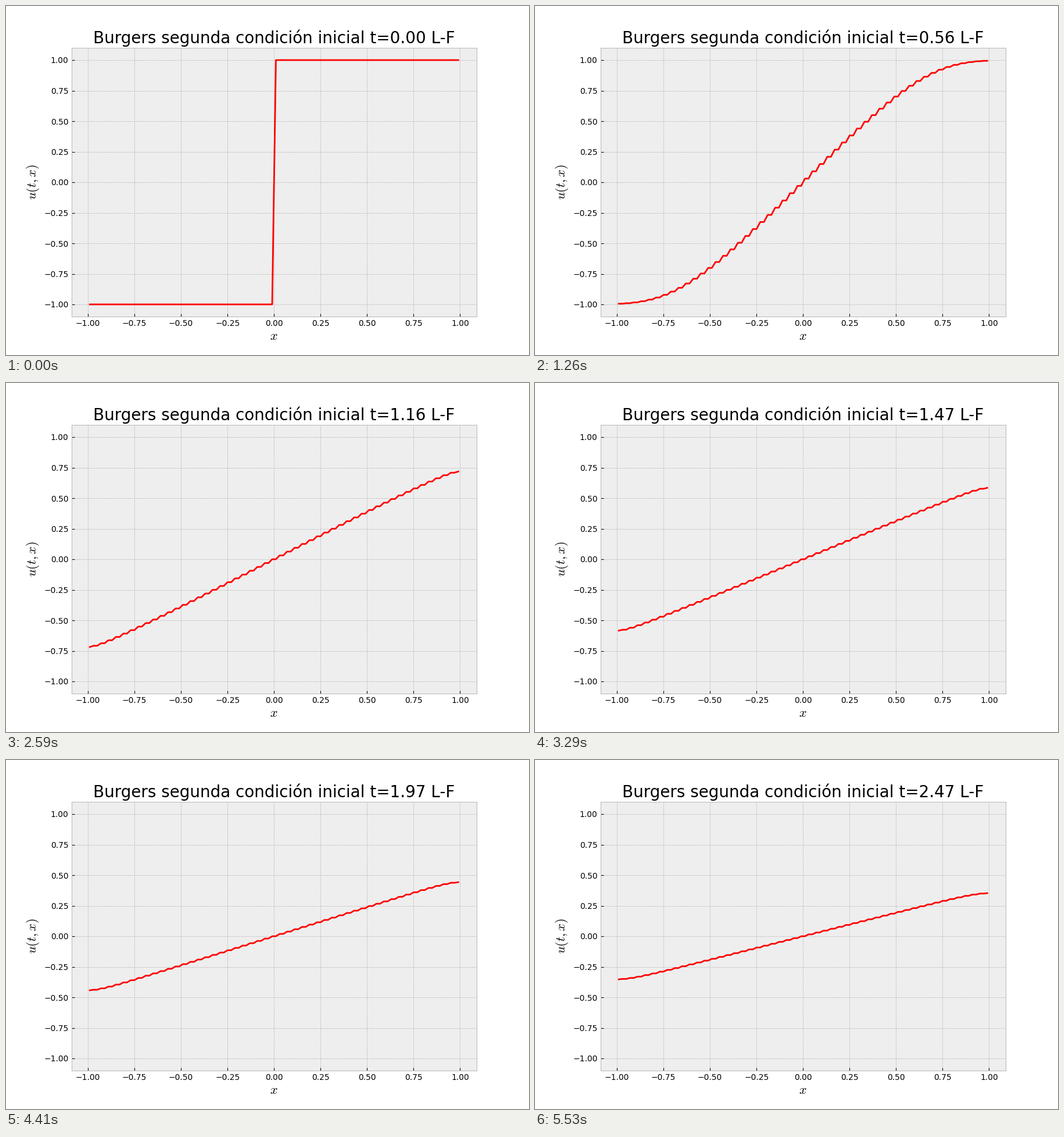
A matplotlib script that plays this animation: 900x600 px, repeating every 5600 ms.

```python
import numpy as np
import matplotlib.pyplot as plt
from matplotlib.animation import FuncAnimation

FRAMES = 80
INTERVAL = 70
CELLS = 100
STEPS = 5  # solver steps per frame
T_END = 2.5

dx = 2 / CELLS
dt = T_END / (FRAMES * STEPS)
x = -1 + dx * (np.arange(CELLS) + 0.5)


def lax_friedrichs(u):
    """One step for the flux u^2/2 with outflow on both sides."""
    v = np.pad(u, 1, mode="edge")
    left, right = v[:-2], v[2:]
    return (left + right) / 2 - dt / (4 * dx) * (right**2 - left**2)


def solve():
    u = np.where(x < 0, -1.0, 1.0)
    states = []
    for _ in range(FRAMES):
        states.append(u)
        for _ in range(STEPS):
            u = lax_friedrichs(u)
    return states


states = solve()

plt.style.use("bmh")
fig, ax = plt.subplots(figsize=(9, 6), dpi=100)
line, = ax.plot(x, states[0], color="red", lw=2)
ax.set_ylim(-1.1, 1.1)
ax.set_xlabel("$x$", fontsize=16)
ax.set_ylabel("$u(t,x)$", fontsize=16)
title = ax.set_title("", fontsize=20)


def update(i):
    line.set_ydata(states[i])
    t = i * STEPS * dt
    title.set_text(f"Burgers segunda condición inicial t={t:.2f} L-F")
    return line, title


anim = FuncAnimation(fig, update, frames=FRAMES, interval=INTERVAL, repeat=True)
plt.show()
```
